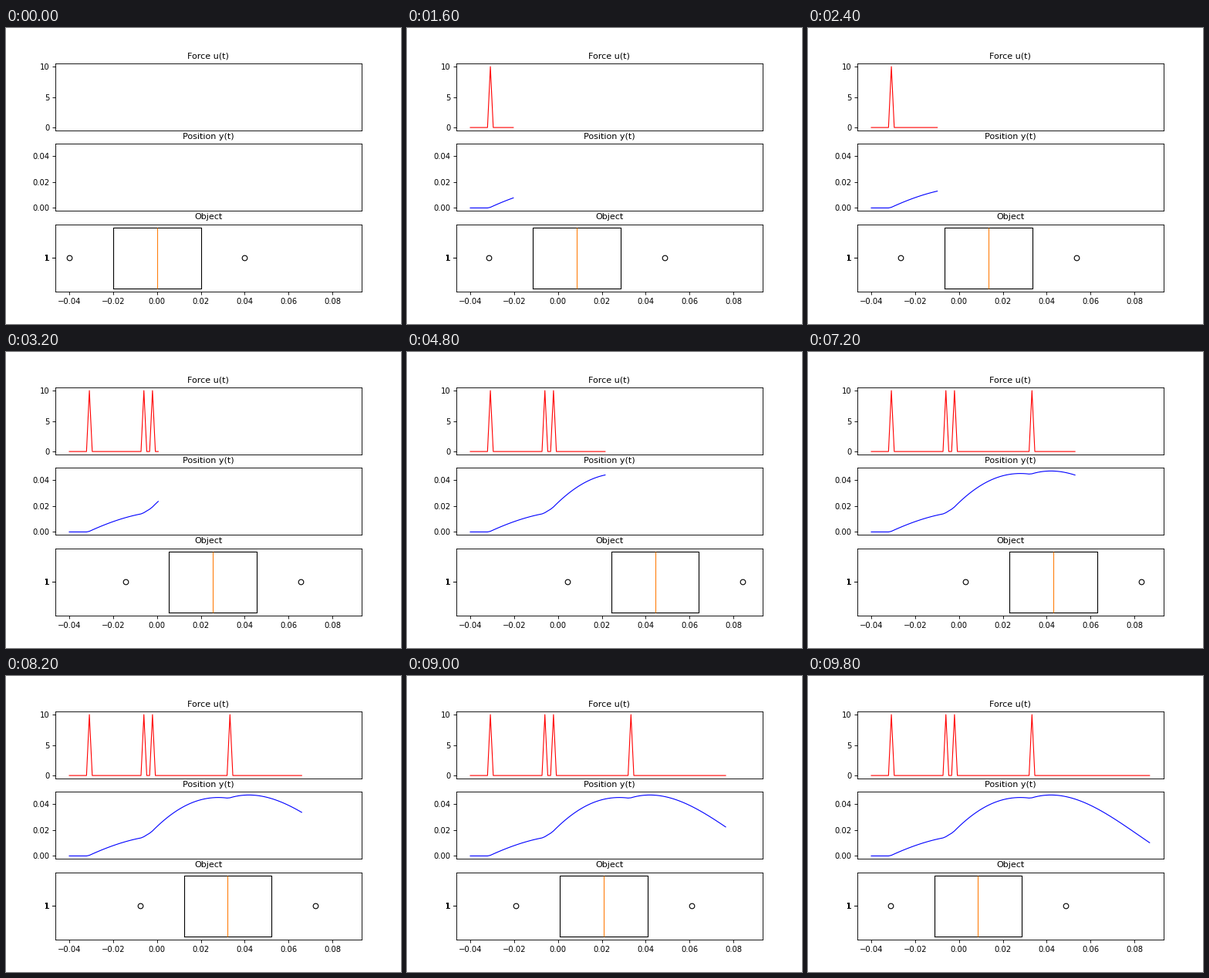
These frames come from a looping animation (512x384 px, 10000 ms). A matplotlib script:

```python
import numpy as np
import matplotlib.pyplot as plt
from matplotlib.animation import FuncAnimation

FRAMES = 50
POINTS = 98
KICKS = [7, 26, 29, 56]          # samples at which the force fires
FORCE = 10
GAIN, DECAY, FREQ = 0.00102, 0.0106, 0.0436
HALF_BOX, HALF_SPAN = 0.02, 0.04


def response(t):
    """Damped oscillator answering one short push."""
    t = np.clip(t, 0, None)
    return GAIN * np.exp(-DECAY * t) * np.sin(FREQ * t) / FREQ


n = np.arange(POINTS + 1)
force = np.where(np.isin(n, KICKS), FORCE, 0)
pos = sum(response(n - k + 0.5) for k in KICKS)
top = pos.max()
left, right = -HALF_SPAN, top + HALF_SPAN
xs = np.linspace(left, right, POINTS)


def padded(lo, hi):
    pad = 0.05 * (hi - lo)
    return lo - pad, hi + pad


plt.rcParams.update({"font.family": "DejaVu Sans", "font.size": 9})
fig, (ax_u, ax_y, ax_o) = plt.subplots(3, 1, figsize=(6.4, 4.8), dpi=80)
fig.subplots_adjust(left=0.125, right=0.9, bottom=0.11, top=0.88, hspace=0.2)

panels = [
    (ax_u, "Force u(t)", (0, FORCE), [0, 5, 10]),
    (ax_y, "Position y(t)", (0, top), [0, 0.02, 0.04]),
    (ax_o, "Object", (0.925, 1.075), [1]),
]
for ax, title, span, ticks in panels:
    ax.set_title(title, fontsize=10, pad=6)
    ax.set_xticks([])
    ax.set_yticks(ticks)
    ax.set_xlim(padded(left, right))
    ax.set_ylim(padded(*span))

# stacked ticks give the heavy "1" label
ax_o.set_yticks([1] * FRAMES, ["1"] * FRAMES)
ax_o.set_xticks([-0.04, -0.02, 0, 0.02, 0.04, 0.06, 0.08])

u_line, = ax_u.plot([], [], color="red", lw=1)
y_line, = ax_y.plot([], [], color="blue", lw=1)
box, = ax_o.plot([], [], color="black", lw=1)
fliers, = ax_o.plot([], [], "o", ms=6, mfc="none", mec="black", mew=1)
median, = ax_o.plot([], [], color="#ff7f0e", lw=1, solid_capstyle="butt")


def draw(frame):
    m = 2 * frame
    u_line.set_data(xs[:m], force[:m])
    y_line.set_data(xs[:m], pos[:m])
    c = pos[m]
    a, b = c - HALF_BOX, c + HALF_BOX
    box.set_data([a, b, b, a, a], [0.925, 0.925, 1.075, 1.075, 0.925])
    median.set_data([c, c], [0.925, 1.075])
    fliers.set_data([c - HALF_SPAN, c + HALF_SPAN], [1, 1])
    return u_line, y_line, box, median, fliers


anim = FuncAnimation(fig, draw, frames=FRAMES, interval=200, repeat=True,
                     init_func=lambda: draw(0))
plt.show()
```
